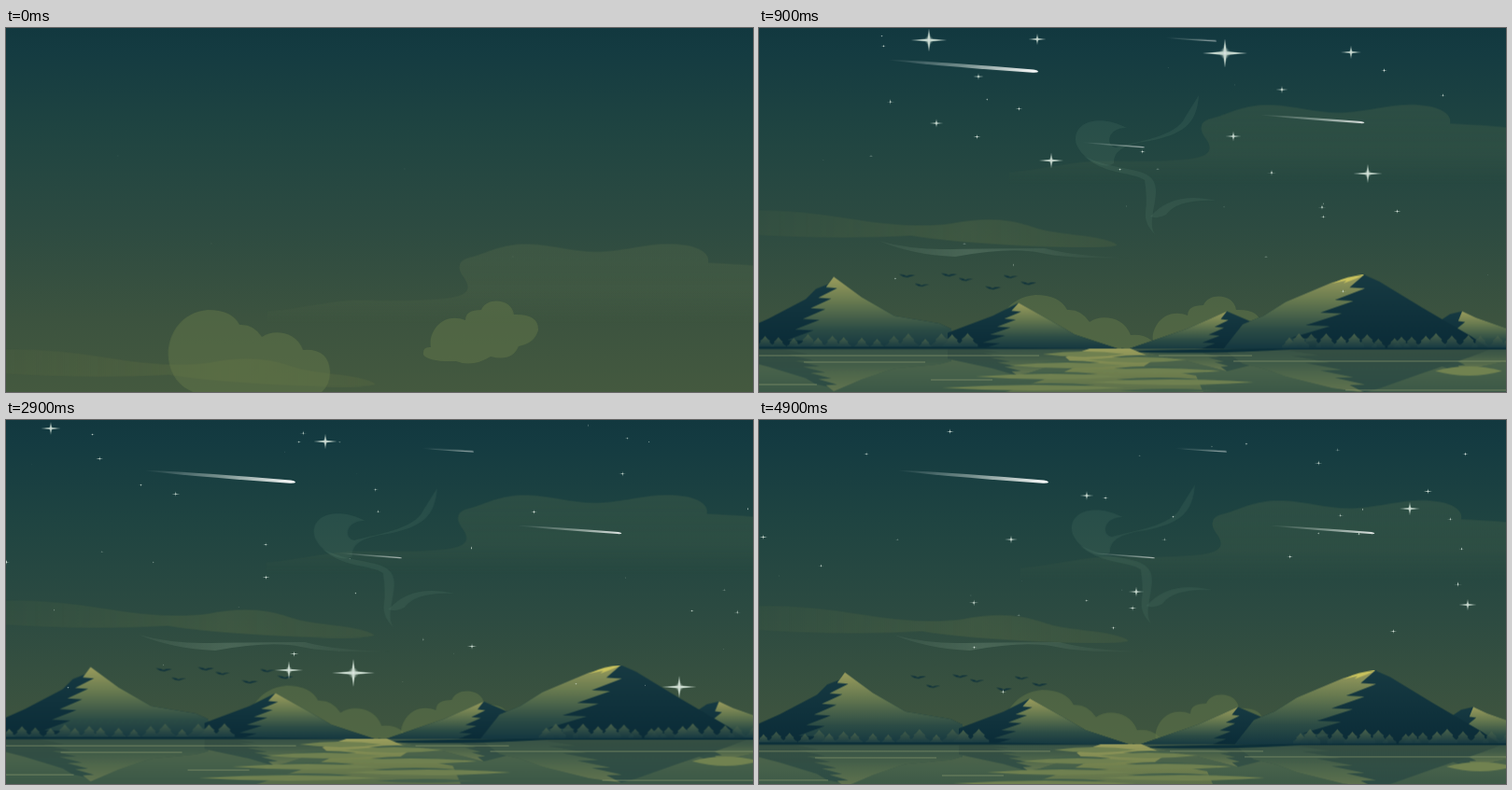
An HTML page that plays this animation: 800x390 px, repeating every 5 s.

```html
<!DOCTYPE html>
<html lang="en">
<head>
<meta charset="utf-8">
<title>Night lake</title>
<style>
html, body { margin: 0; width: 100%; height: 100%; overflow: hidden; background: #133a42; }
svg { display: block; width: 100vw; height: 100vh; }
.loop { animation: 5s linear infinite both; }
#far, #land { animation-name: pan; }
#puffL { animation-name: puffL; }
#puffR { animation-name: puffR; }
#smoke { animation-name: smoke; }
#ribbon { animation-name: ribbon; }
#meteors { animation-name: meteors; }
#birds { animation-name: birds; }
#late { animation-name: late; animation-timing-function: step-end; }
.star { opacity: .88; animation: twinkle 5s infinite both; }

@keyframes pan {
  0% { transform: translate(0, 150px); animation-timing-function: cubic-bezier(.33, .46, .67, .78); }
  6% { transform: translate(-9px, 49px); animation-timing-function: cubic-bezier(.25, .7, .6, 1); }
  18% { transform: translate(-12px, .5px); }
  38% { transform: translate(-6.5px, -2px); }
  58% { transform: translate(-1.5px, -1.5px); animation-timing-function: ease-out; }
  74% { transform: translate(0, 0); animation-timing-function: ease-in; }
  100% { transform: translate(0, 5px); }
}
@keyframes puffL {
  0% { transform: translate(0, 0); }
  6% { transform: translate(43px, -7px); animation-timing-function: ease-out; }
  18% { transform: translate(80px, -16px); }
  74% { transform: translate(86px, -18px); animation-timing-function: ease-in; }
  100% { transform: translate(87px, -12px); }
}
@keyframes puffR {
  0% { transform: translate(0, 0); }
  6% { transform: translate(-20px, -5px); animation-timing-function: ease-out; }
  18% { transform: translate(-33px, -5px); }
  74% { transform: translate(-31px, -1px); animation-timing-function: ease-in; }
  100% { transform: translate(-30px, 2px); }
}
@keyframes smoke {
  0% { transform: translate(2px, 2px); opacity: 0; }
  6% { transform: translate(4px, 2px); opacity: .12; }
  18% { transform: translate(8px, 0); opacity: 1; }
  38% { transform: translate(-3px, 2px); }
  74% { transform: translate(0, 0); }
  100% { transform: translate(4px, -3px); opacity: 1; }
}
@keyframes ribbon {
  0%, 7% { transform: translate(-40px, 10px); opacity: 0; animation-timing-function: ease-out; }
  18% { transform: translate(-16px, -1px); opacity: 1; }
  38% { transform: translate(4px, 0); }
  58% { transform: translate(-2px, 1px); }
  100% { transform: translate(0, 1px); opacity: 1; }
}
@keyframes meteors {
  0%, 7% { transform: translate(-130px, -34px); opacity: 0; animation-timing-function: ease-out; }
  15% { opacity: 1; }
  18% { transform: translate(-11px, -20px); animation-timing-function: ease-out; }
  38% { transform: translate(8px, -7px); animation-timing-function: ease-in-out; }
  58%, 100% { transform: translate(0, 0); opacity: 1; }
}
@keyframes birds {
  0%, 8% { transform: translate(-14px, 4px); opacity: 0; animation-timing-function: ease-out; }
  18% { transform: translate(0, -13px); opacity: 1; animation-timing-function: ease-in-out; }
  38% { transform: translate(0, -2.5px); animation-timing-function: ease-in-out; }
  58% { transform: translate(0, -9px); animation-timing-function: ease-in-out; }
  74% { transform: translate(0, 0); animation-timing-function: ease-in-out; }
  98%, 100% { transform: translate(0, -7px); opacity: 1; }
}
@keyframes late { 0% { visibility: hidden; } 50%, 100% { visibility: visible; } }
@keyframes twinkle {
  0% { scale: 0; animation-timing-function: ease-out; }
  12% { scale: var(--s); animation-timing-function: ease-in; }
  24%, 100% { scale: 0; }
}
</style>
</head>
<body>
<svg viewBox="0 0 800 390" preserveAspectRatio="none">
<defs>
  <linearGradient id="sky" x2="0" y2="1">
    <stop stop-color="#12383f"/><stop offset=".06" stop-color="#143b41"/><stop offset=".28" stop-color="#1f4441"/>
    <stop offset=".55" stop-color="#2d4b41"/><stop offset=".8" stop-color="#3c533f"/><stop offset="1" stop-color="#44593f"/>
  </linearGradient>
  <linearGradient id="bank" x2="0" y2="1">
    <stop stop-color="#7f8c58" stop-opacity=".17"/><stop offset=".6" stop-color="#7f8c58" stop-opacity=".12"/><stop offset="1" stop-color="#7f8c58" stop-opacity="0"/>
  </linearGradient>
  <linearGradient id="drift">
    <stop stop-color="#7f8848" stop-opacity=".07"/><stop offset=".6" stop-color="#7f8848" stop-opacity=".2"/><stop offset="1" stop-color="#7f8848" stop-opacity=".14"/>
  </linearGradient>
  <linearGradient id="wisp">
    <stop stop-color="#7d9a84" stop-opacity=".1"/><stop offset=".35" stop-color="#7d9a84" stop-opacity=".32"/><stop offset="1" stop-color="#7d9a84" stop-opacity="0"/>
  </linearGradient>
  <linearGradient id="lit" x2="0" y2="1">
    <stop stop-color="#9a9c5c"/><stop offset=".35" stop-color="#65784f"/><stop offset=".72" stop-color="#2c4c45"/><stop offset="1" stop-color="#123540"/>
  </linearGradient>
  <linearGradient id="shade" x2="0" y2="1"><stop stop-color="#173a42"/><stop offset="1" stop-color="#0a2b37"/></linearGradient>
  <linearGradient id="leaf" x2="0" y2="1"><stop stop-color="#4a624a"/><stop offset="1" stop-color="#153842"/></linearGradient>
  <linearGradient id="water" x2="0" y2="1">
    <stop stop-color="#52664a"/><stop offset=".35" stop-color="#45604a"/><stop offset="1" stop-color="#2b4a42"/>
  </linearGradient>
  <linearGradient id="glint" x2="0" y2="1"><stop stop-color="#9a9d5c"/><stop offset=".4" stop-color="#75834f"/><stop offset="1" stop-color="#53694a"/></linearGradient>
  <linearGradient id="tail">
    <stop stop-color="#fff" stop-opacity="0"/><stop offset=".5" stop-color="#e8f2ea" stop-opacity=".45"/><stop offset="1" stop-color="#fff"/>
  </linearGradient>
  <radialGradient id="glow">
    <stop stop-color="#fff"/><stop offset=".35" stop-color="#dcebe0" stop-opacity=".55"/><stop offset="1" stop-color="#dcebe0" stop-opacity="0"/>
  </radialGradient>
  <g id="star">
    <path d="M-10 0L0 -.7 10 0 0 .7ZM0 -6.5L.7 0 0 6.5 -.7 0Z" fill="#dcebe0"/>
    <ellipse rx="7" ry="1.2" fill="url(#glow)"/>
    <ellipse rx="1.4" ry="4.6" fill="url(#glow)"/>
    <circle r="2.6" fill="url(#glow)"/>
  </g>
  <path id="tree" d="M0 -15Q3 -11 6 -9L5 -8Q7 -5 10 -4L10 0H-10V-4Q-7 -5 -5 -8L-6 -9Q-3 -11 0 -15Z" fill="url(#leaf)"/>
  <path id="bird" d="M-8 -1.5Q-3 -2 0 .3Q4 -1.6 9 -.6Q5 0 1 1.8Q-4 1.6 -8 -1.5Z"/>
  <path id="meteor" d="M0 -.5Q70 3 157 10.6Q162 11.6 162 13Q161 14 156 13.8Q70 8 0 .5Z" fill="url(#tail)"/>
</defs>

<rect width="800" height="390" fill="url(#sky)"/>

<g id="far" class="loop">
  <path fill="url(#bank)" d="M830 108Q800 104 752 102C754 93 745 84 718 82S668 88 640 90S590 83 560 82S515 92 494 97Q480 102 489 116C500 130 494 136 478 139S420 143 385 142S325 150 280 154V168H830Z"/>
  <path fill="url(#drift)" d="M-10 195Q45 193 110 204T218 209C255 202 280 204 306 213S382 221 396 232Q385 237 300 233T175 222Q90 227 -10 220Z"/>
</g>

<path id="puffL" class="loop" fill="#677a4b" fill-opacity=".46" d="M196 388C160 370 168 306 216 302Q242 302 250 318Q265 317 274 331C285 323 310 324 318 345Q345 343 347 368Q347 382 338 390H200Z"/>
<path id="puffR" class="loop" fill="#677a4b" fill-opacity=".46" d="M447 350Q446 341 455 342C452 325 468 304 492 313Q492 302 509 302C514 288 542 289 544 307Q571 306 570 324Q566 338 549 341Q542 358 519 352Q500 364 482 357Q452 358 447 350Z"/>

<g id="smoke" class="loop" fill="#6b9482" fill-opacity=".14">
  <path d="M463 72C461 104 445 114 410 121Q370 126 372 145C360 154 332 136 331 120C330 98 360 93 386 107C366 106 362 125 374 128C395 122 440 116 448 96Z"/>
  <path d="M340 137C374 154 404 148 414 163S405 208 417 222Q404 210 406 196T405 163C392 154 360 157 340 137Z"/>
  <path d="M411 202Q435 174 482 185Q440 183 428 200Q419 205 411 202Z"/>
</g>
<path id="ribbon" class="loop" fill="url(#wisp)" d="M144 229Q180 239 222 238T322 237Q355 246 420 247Q350 249 318 242T226 246Q180 244 144 229Z"/>

<g id="land" class="loop">
  <g id="peaks"></g>
  <path fill="#c8c25d" d="M626 273Q642 265 660 264Q655 267 638 273L641 270Z"/>
  <g id="trees"></g>
  <rect x="-20" y="343" width="840" height="80" fill="url(#water)"/>
  <use href="#peaks" transform="translate(0 543) scale(1 -.58)" opacity=".4"/>
  <path fill="#0c2f39" d="M-20 341H236L390 343.5H-20ZM402 346Q480 342 820 342V344H580Q480 350 402 346Z"/>
  <path fill="url(#glint)" d="M366 343H410L436 354 424 362 480 372 490 395H260L330 372 352 362 340 352Z"/>
  <g id="pools"></g>
  <g id="lines" fill="#98a475"></g>
  <g id="birds" class="loop" fill="#12343c"></g>
</g>

<g id="meteors" class="loop">
  <use href="#meteor" transform="translate(148 54)"/>
  <use href="#meteor" transform="translate(444 30) scale(.352 .31)" opacity=".75"/>
  <use href="#meteor" transform="translate(356 142.5) scale(.42)" opacity=".6"/>
  <use href="#meteor" transform="translate(546 113) scale(.7 .66)" opacity=".85"/>
</g>

<g id="early"></g>
<g id="late" class="loop"></g>
</svg>

<script>
const LOOP = 5000, LIFE = 1200;
const $ = id => document.getElementById(id);

function add(parent, tag, attrs) {
  const el = document.createElementNS('http://www.w3.org/2000/svg', tag);
  for (const key in attrs) el.setAttribute(key, attrs[key]);
  $(parent).append(el);
  return el;
}
const put = (parent, shape, style) => add(parent, 'use', { href: '#' + shape, style });

let seed = 11;
function rand() {
  seed = (seed * 16807) % 2147483647;
  return seed / 2147483647;
}

// Jagged edge of the lit face, running from the peak down to its foot.
function jag([x, y], foot, n, tooth) {
  const edge = [[x, y]];
  for (let i = 1; i <= n; i++) {
    const k = i / (n + 1), px = x + (foot - x) * k, py = y + (345 - y) * k;
    edge.push([px, py], [px + tooth * (.5 + k * .7), py + 1]);
  }
  return [...edge, [foot, 345]];
}

// left runs from base to peak, right from peak to base.
function mountain(left, right, side, foot, n, tooth) {
  const poly = (points, fill) => add('peaks', 'polygon', { points: points.join(' '), fill: `url(#${fill})` });
  const outer = side === 'left' ? left : [...right].reverse();
  const base = [outer[0][0], 345];
  poly([[left[0][0], 345], ...left, ...right, [right.at(-1)[0], 345]], 'shade');
  poly([...jag(right[0], foot, n, tooth), base, ...outer], 'lit');
}

mountain([[734, 318], [752, 306]], [[765, 303], [780, 310], [820, 324]], 'right', 748, 3, 11);
mountain([[-14, 327], [22, 311], [62, 290], [73, 279], [86, 274]],
  [[92, 266], [122, 288], [157, 308], [205, 316], [218, 322]], 'right', 34, 6, 20);
mountain([[214, 326], [262, 308]], [[290, 294], [326, 314], [350, 328], [402, 345]], 'right', 244, 5, 17);
mountain([[400, 346], [470, 322]], [[513, 303], [548, 318], [580, 346]], 'left', 480, 4, 13);
mountain([[508, 345], [530, 317], [552, 308], [576, 293], [626, 272]],
  [[660, 264], [676, 271], [722, 299], [775, 330], [797, 345]], 'left', 566, 5, 27);

function grove(from, to) {
  for (let x = from; x < to; x += 10 + rand() * 9)
    put('trees', 'tree', `translate:${x}px 343px;scale:${.7 + rand() * .4};opacity:${.7 + rand() * .3}`);
}
grove(-8, 110);
grove(122, 238);
grove(580, 694);
grove(700, 815);

// Bright and dark lenses along the light path, wider towards the shore.
const lens = (x, y, w, h, fill) =>
  add('pools', 'path', { d: `M${x - w} ${y}q${w} ${-h * 2} ${w * 2} 0q${-w} ${h * 2} ${-w * 2} 0`, fill });
for (let i = 0; i < 7; i++) {
  const y = 349 + i * 6, swing = i % 2 ? 1 : -1;
  lens(384 + swing * (24 + i * 9), y, 44 + i * 9, 3, '#6f8050');
  lens(384 - swing * (36 + i * 5), y + 3, 30 + i * 4, 2, '#435f4a');
}
lens(772, 367, 36, 5, '#718250');

for (const [x, y, w] of [[-20, 350, 332], [520, 356, 300], [-20, 381, 94], [196, 376, 66], [640, 387, 180], [440, 350, 100], [60, 357, 130]])
  add('lines', 'rect', { x, y, width: w, height: 1, opacity: .55 });

[[170, 278], [186, 288], [215, 277], [233, 282], [262, 291], [281, 279], [300, 286]]
  .forEach(([x, y], i) => put('birds', 'bird', `translate:${x}px ${y}px;scale:${i % 2 ? .9 : 1}`));

// Stars born near the end stay hidden after the loop restarts.
function star(x, y, size, birth) {
  const group = birth + LIFE > LOOP ? 'late' : 'early';
  put(group, 'star', `translate:${x}px ${y}px;--s:${size};animation-delay:${birth - LOOP}ms`)
    .setAttribute('class', 'star');
}

// Time of full size, largest size, then places from large to small.
function burst(peak, top, ...places) {
  places.forEach(([x, y], i) => star(x, y, .5 + (top - .5) * .75 ** i, peak - LIFE / 2));
}
burst(500, .5, [120, 137], [427, 151], [220, 231], [543, 245]);
burst(620, 1.2, [508, 116], [190, 102], [560, 66], [235, 52], [549, 155], [603, 192]);
burst(900, 2.4, [499, 27], [182, 13], [652, 156], [313, 142], [634, 26], [298, 12]);
burst(1900, 1.3, [408, 41], [104, 27], [572, 246], [244, 232], [378, 66]);
burst(2900, 2.3, [372, 271], [721, 286], [303, 268], [342, 23], [48, 9]);
burst(3700, 2.8, [574, 121], [246, 107], [700, 206], [621, 18], [610, 269]);
burst(4900, 1.1, [697, 95], [759, 198], [404, 184], [351, 81], [270, 128]);

for (let i = 0; i < 170; i++)
  star(rand() * 800, 4 + rand() * 290, .26 + rand() * .28, rand() * 4700);
</script>
</body>
</html>
```
